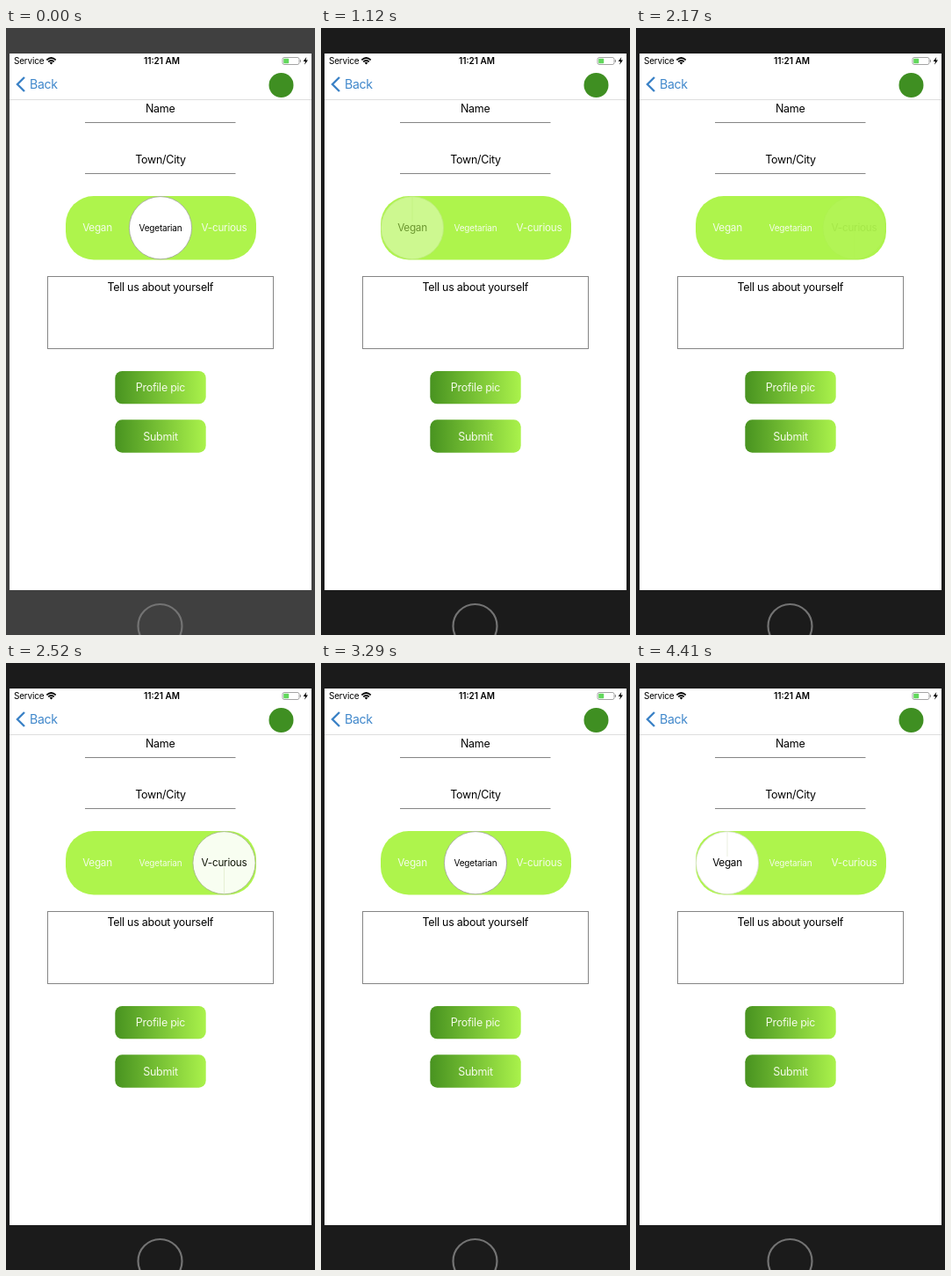
An HTML page that plays this animation: 352 px wide and 690 px high, repeating every 4.48 s.

```html
<!DOCTYPE html>
<html lang="en">
<head>
<meta charset="utf-8">
<title>Profile form</title>
<style>
  html, body { margin: 0; width: 100%; height: 100%; overflow: hidden; background: #1b1b1b; }
  svg { display: block; width: 352px; height: 690px; }
  text { font-family: Inter, Roboto, sans-serif; font-size: 12.46px; letter-spacing: -.02em; text-anchor: middle; }
  .status { font-size: 10px; }
  .start { text-anchor: start; }
  .light { fill: #f4fbe9; }
  .rule { stroke: #858585; fill: none; }
  .choice { font-size: 11.7px; }
  .small { font-size: 10px; }
</style>
</head>
<body>
<svg viewBox="0 0 352 690">
  <defs>
    <linearGradient id="leaf">
      <stop offset="0" stop-color="#489320"/>
      <stop offset="1" stop-color="#aaf24b"/>
    </linearGradient>
  </defs>

  <rect id="bezel" width="352" height="690"/>
  <circle cx="175.5" cy="680" r="25" fill="none" stroke="#737373" stroke-width="2.2"/>
  <rect x="4" y="29" width="344" height="610" fill="#fff"/>

  <!-- status bar -->
  <text class="status start" x="9" y="41.4">Service</text>
  <g fill="none" stroke="#000" stroke-width="1.7">
    <path d="M46.3 36.3Q51.5 31.7 56.7 36.3M48.2 38.4Q51.5 35.6 54.8 38.4"/>
    <path d="M49.6 39.5Q51.5 38 53.4 39.5L51.5 41.5Z" fill="#000" stroke="none"/>
  </g>
  <text class="status" x="177.5" y="41.4" font-weight="600" style="letter-spacing:0">11:21 AM</text>
  <rect x="315" y="33.5" width="19" height="8" rx="2" fill="#fff" stroke="#9a9a9a" stroke-width=".9"/>
  <rect x="316.2" y="34.7" width="6" height="5.6" rx=".8" fill="#62d75c"/>
  <path d="M335.4 36V39" stroke="#9a9a9a" stroke-width="1.2"/>
  <path d="M342.3 33L338.6 38H341L340 41.8L344 36.6H341.5Z"/>

  <!-- navigation bar -->
  <path d="M21 56L13 64L21 72" fill="none" stroke="#3b82c6" stroke-width="2.4"/>
  <text class="start" x="27" y="68.8" fill="#3f87cb" style="font-size:14.1px">Back</text>
  <circle cx="313.5" cy="65" r="14" fill="#3f8f22"/>
  <path d="M4 81.5H348" stroke="#dedede"/>

  <!-- form -->
  <text x="175.7" y="96.4">Name</text>
  <path class="rule" d="M90 107.5H261.5M90 165.5H261.5"/>
  <text x="176" y="154">Town/City</text>
  <rect x="68" y="191" width="217" height="72.5" rx="32" fill="#aef44c"/>
  <g id="choices"></g>
  <rect class="rule" x="47.5" y="282.5" width="257" height="82"/>
  <text x="175.8" y="299.4">Tell us about yourself</text>
  <rect x="124.3" y="390" width="103.4" height="37.3" rx="8" fill="url(#leaf)"/>
  <text class="light" x="176" y="413">Profile pic</text>
  <rect x="124.3" y="445.3" width="103.4" height="37.4" rx="8" fill="url(#leaf)"/>
  <text class="light" x="176" y="468.5">Submit</text>
</svg>
<script>
const LOOP = 4480, STEP = 70, FADE = 500, PRESS = 110, FOCUS = 630;
const NS = 'http://www.w3.org/2000/svg';

const options = [
  { label: 'Vegan', x: 104, cls: 'choice', rim: '#d3dfc0', seam: [192, 220] },
  { label: 'Vegetarian', x: 176, cls: 'small', rim: '#a3a99b' },
  { label: 'V-curious', x: 248.5, cls: 'choice', rim: '#a3b48c', seam: [232, 262] }
];

// Each tap picks an option, which then fades in.
const taps = [
  { at: -FADE, pick: 1 },
  { at: 910, pick: 0 },
  { at: 1490, pick: 1 },
  { at: 2105, pick: 2 },
  { at: 2790, pick: 1 },
  { at: 3490, pick: 0 }
];

function add(parent, tag, attrs, text = '') {
  const el = document.createElementNS(NS, tag);
  for (const key in attrs) el.setAttribute(key, attrs[key]);
  el.textContent = text;
  return parent.appendChild(el);
}

const bezel = document.getElementById('bezel');
const choices = document.getElementById('choices');

for (const o of options) {
  const y = o.cls === 'small' ? 230.9 : 231.4;
  o.idle = add(choices, 'text', { class: o.cls + ' light', x: o.x, y }, o.label);
  o.active = add(choices, 'g', {});
  add(o.active, 'circle', { cx: o.x, cy: 227.2, r: 35.6, fill: '#fff', stroke: o.rim, 'stroke-width': .9 });
  if (o.seam) {
    add(o.active, 'path', { d: `M${o.x} ${o.seam[0]}V${o.seam[1]}`, stroke: '#e6ebd9', 'stroke-width': .8 });
  }
  add(o.active, 'text', { class: o.cls, x: o.x, y }, o.label);
}

const easeInOut = p => p * p * (3 - 2 * p);

function draw(time) {
  const t = Math.floor((time % LOOP) / STEP) * STEP;
  const current = taps.filter(tap => tap.at <= t).pop();
  const pressed = taps.find(tap => t < tap.at && t >= tap.at - PRESS);
  const fade = easeInOut(Math.min(1, (t - current.at) / FADE));

  bezel.setAttribute('fill', t < FOCUS ? '#404040' : '#1b1b1b');
  options.forEach((o, i) => {
    const on = i === current.pick;
    const held = pressed && pressed.pick === i;
    o.active.setAttribute('opacity', on ? fade : 0);
    o.idle.setAttribute('opacity', on ? 0 : held ? .2 : 1);
  });
}

const start = performance.now();
function tick() {
  draw(performance.now() - start);
  requestAnimationFrame(tick);
}
tick();
</script>
</body>
</html>
```
